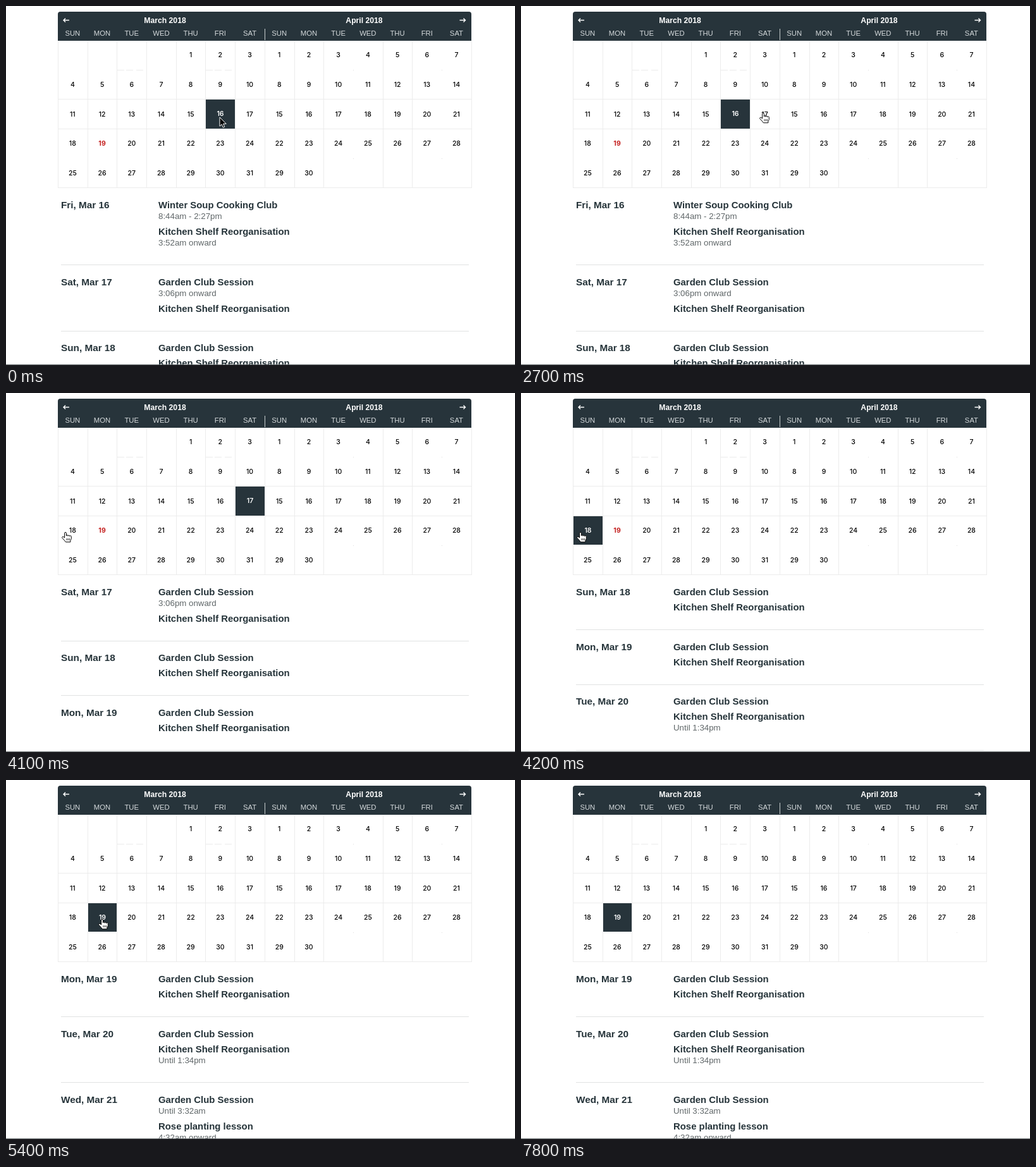
An HTML page for the animation above (8 s loop, 805 by 568 pixels).

```html
<!DOCTYPE html>
<html lang="en">
<head>
<meta charset="utf-8">
<title>Event calendar</title>
<style>
  html, body { margin: 0; width: 100%; height: 100%; overflow: hidden; background: #fff; }
  body { font-family: "Liberation Sans", Arial, sans-serif; }
  #stage { position: relative; width: 805px; height: 568px; overflow: hidden; background: #fff; }
  #stage > *, #cal > *, #cal { position: absolute; }
  #head { left: 82px; top: 9px; width: 654px; height: 46px; background: #27343b; border-radius: 4px 4px 0 0; }
  .label { width: 120px; margin: -10px 0 0 -60px; line-height: 20px; text-align: center; white-space: nowrap; }
  .month { font-size: 12.2px; font-weight: 700; color: #fff; }
  .week { font-size: 11.3px; color: #d5dadc; }
  .day { font: 500 10.5px/20px Inter, sans-serif; color: #000; }
  .today { font-weight: 700; color: #c4201f; }
  .pick { background: #27343b; visibility: hidden;
    font: 600 10.5px/46px Inter, sans-serif; color: #fff; text-align: center; }

  #agenda { left: 82px; top: 301px; width: 655px; height: 266px; overflow: hidden; color: #26343a; }
  #list { position: relative; }
  .group { position: relative; box-sizing: border-box; padding: 5px 0 0 159px; }
  .group::after { content: ""; position: absolute; left: 5px; bottom: 12.4px; width: 645px; height: 1px; background: #e0e2e2; }
  .date { position: absolute; left: 5px; font: 700 15.3px/18px "Liberation Sans", Arial, sans-serif; }
  .title { font-size: 14.9px; font-weight: 700; line-height: 18px; }
  .time { font-size: 13.3px; line-height: 17.6px; color: #5f6668; }
  .item { margin-bottom: 6.3px; white-space: nowrap; }
  #edge { left: 0; top: 567px; width: 805px; height: 1px; background: #6b7173; }
  svg { overflow: visible; }
  #pointer { left: 0; top: 0; width: 1px; height: 1px; z-index: 1; }

  #list, .pick, #pointer, #arrow, #hand { animation: 8s step-end infinite; }
  #list { animation-name: list; }
  #pick16 { animation-name: pick16; }
  #pick17 { animation-name: pick17; }
  #pick18 { animation-name: pick18; }
  #pick19 { animation-name: pick19; }
  #pointer { animation-name: move; }
  #arrow { animation-name: arrow; }
  #hand { animation-name: hand; }

  @keyframes list {
    0% { top: 0; }
    36.25% { top: -121.8px; }
    52.5% { top: -226px; }
    67.5%, 100% { top: -312.6px; }
  }
  @keyframes pick16 { 0% { visibility: visible; } 36.25%, 100% { visibility: hidden; } }
  @keyframes pick17 { 0% { visibility: hidden; } 36.25% { visibility: visible; } 52.5%, 100% { visibility: hidden; } }
  @keyframes pick18 { 0% { visibility: hidden; } 52.5% { visibility: visible; } 67.5%, 100% { visibility: hidden; } }
  @keyframes pick19 { 0% { visibility: hidden; } 67.5%, 100% { visibility: visible; } }
  @keyframes arrow { 0% { visibility: visible; } 21.25%, 100% { visibility: hidden; } }
  @keyframes hand { 0% { visibility: hidden; } 21.25% { visibility: visible; } 95%, 100% { visibility: hidden; } }
  @keyframes move {
    0% { transform: translate(338px, 176px); }
    21.25% { transform: translate(358px, 174px); }
    22.5% { transform: translate(370px, 171px); }
    23.75% { transform: translate(378px, 170px); }
    25% { transform: translate(382px, 169px); }
    33.75% { transform: translate(383px, 169px); }
    43.75% { transform: translate(367px, 172px); }
    45% { transform: translate(325px, 180px); }
    46.25% { transform: translate(268px, 190px); }
    47.5% { transform: translate(205px, 202px); }
    48.75% { transform: translate(150px, 212px); }
    50% { transform: translate(110px, 218px); }
    51.25% { transform: translate(94px, 220px); }
    58.75% { transform: translate(97px, 220px); }
    60% { transform: translate(107px, 220px); }
    61.25% { transform: translate(121px, 220px); }
    62.5% { transform: translate(135px, 220px); }
    63.75% { transform: translate(145px, 220px); }
    65% { transform: translate(150px, 220px); }
    66.25% { transform: translate(152px, 220px); }
    88.75% { transform: translate(166px, 198px); }
    90% { transform: translate(196px, 150px); }
    91.25%, 100% { transform: translate(215px, 119px); }
  }
</style>
</head>
<body>
<div id="stage">
  <div id="head"></div>
  <div id="cal"></div>
  <svg width="805" height="60" fill="none" stroke="#fff" stroke-width="1.4">
    <path d="M100 22.5H91M94 19.5l-3 3 3 3M717.5 22.5h9M723.5 19.5l3 3-3 3"/>
  </svg>
  <div id="agenda"><div id="list"></div></div>
  <div id="edge"></div>
  <svg id="pointer">
    <path id="arrow" d="M0 0V14.2l3.2-3 2.1 5 2.4-1-2.1-4.8H10.2z" fill="#000" stroke="#fff"/>
    <g id="hand" stroke="#000" stroke-linejoin="round">
      <path fill="#fff" d="M-1.4 9V1.8a1.4 1.4 0 0 1 2.8 0V6a1.3 1.3 0 0 1 2.7.3 1.3 1.3 0 0 1 2.7.4 1.3 1.3 0 0 1 2.5 1V10.6L7.9 13.4V15.8H.4L-1.6 13.2-5 9.4a1.3 1.3 0 0 1 2-1.7z"/>
      <path fill="none" stroke-width=".8" d="M2 10v3.2M4.2 10v3.2M6.4 10v3.2"/>
    </g>
  </svg>
</div>
<script>
  const cal = document.getElementById('cal');
  const list = document.getElementById('list');
  const colX = c => Math.ceil(82.5 + 46.7 * c);
  const rowY = r => Math.floor(55.4 + 46.6 * r);
  const midX = c => 82 + 46.7 * (c + .5);

  function add(parent, cls, text = '', css = '') {
    const el = document.createElement('div');
    el.className = cls;
    el.textContent = text;
    el.style.cssText = css;
    return parent.appendChild(el);
  }
  const rect = (x, y, w, h) => `left:${x}px;top:${y}px;width:${w}px;height:${h}px;`;
  const label = (cls, text, x, y) => add(cal, 'label ' + cls, text, `left:${x}px;top:${y}px`);
  const box = (x, y, w, h, color = '#ececec') => add(cal, 'box', '', rect(x, y, w, h) + 'background:' + color);

  // Grid
  for (let c = 0; c <= 14; c++) {
    const x = colX(c) - 1;
    if (c !== 10 && c !== 13) box(x, 55, 1, 233);
    else [101, 241].forEach(y => box(x, y, 1, 1, '#ddd'));
  }
  [2, 3, 5].forEach(r => box(82, rowY(r) - 1, 654, 1));
  [2, 5].forEach(c => [0, 14, 30].forEach(d => box(colX(c) + d, 101, 11, 1)));
  box(409, 36, 1, 18, '#c9ced0');

  // Months
  label('month', 'March 2018', 251.5, 22.5);
  label('month', 'April 2018', 566.5, 22.5);
  const week = ['SUN', 'MON', 'TUE', 'WED', 'THU', 'FRI', 'SAT'];
  for (let c = 0; c < 14; c++) label('week', week[c % 7], midX(c), 42.5);

  // The picked cell fills the space between its grid lines
  function pick(day, c, r) {
    const x = colX(c), y = rowY(r);
    add(cal, 'pick', day, rect(x, y, colX(c + 1) - 1 - x, rowY(r + 1) - 1 - y)).id = 'pick' + day;
  }

  function month(firstCol, offset, days) {
    for (let d = 1; d <= days; d++) {
      const cell = d - 1 + offset, c = firstCol + cell % 7, r = Math.floor(cell / 7);
      const march = firstCol === 0;
      label(march && d === 19 ? 'day today' : 'day', d, midX(c), 78.3 + 46.6 * r);
      if (march && d >= 16 && d <= 19) pick(d, c, r);
    }
  }
  month(0, 4, 31);
  month(7, 0, 30);

  // Agenda
  const club = 'Garden Club Session', shelf = 'Kitchen Shelf Reorganisation';
  const agenda = [
    ['Fri, Mar 16', ['Winter Soup Cooking Club', '8:44am - 2:27pm'], [shelf, '3:52am onward']],
    ['Sat, Mar 17', [club, '3:06pm onward'], [shelf]],
    ['Sun, Mar 18', [club], [shelf]],
    ['Mon, Mar 19', [club], [shelf]],
    ['Tue, Mar 20', [club], [shelf, 'Until 1:34pm']],
    ['Wed, Mar 21', [club, 'Until 3:32am'], ['Rose planting lesson', '4:32am onward']]
  ];
  for (const [date, ...items] of agenda) {
    const timed = items.filter(i => i[1]).length;
    const group = add(list, 'group', '', `height:${86.6 + 17.6 * timed}px`);
    add(group, 'date', date);
    for (const [title, time] of items) {
      const item = add(group, 'item');
      add(item, 'title', title);
      if (time) add(item, 'time', time);
    }
  }
</script>
</body>
</html>
```
